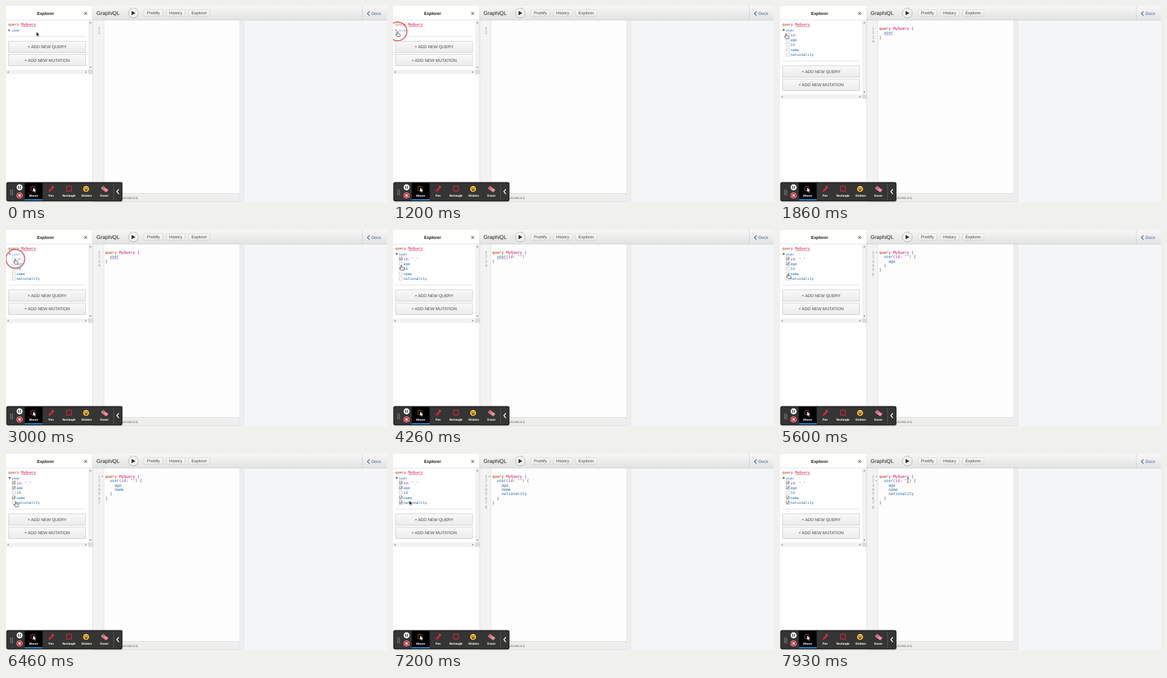
These frames come from a looping animation (640 by 330 pixels, 8 s). An HTML page:

```html
<!DOCTYPE html>
<html lang="en">
<head>
<meta charset="utf-8">
<title>GraphiQL Explorer</title>
<style>
  html, body { margin: 0; width: 100%; height: 100%; overflow: hidden; background: #fff; }
  svg { display: block; }
  text { font: 7px "Liberation Sans", Arial, sans-serif; fill: #444; white-space: pre; text-rendering: geometricPrecision; }
  .mid { text-anchor: middle; }
  .mono text { font: 5.93px "DejaVu Sans Mono", monospace; fill: #555; }
  .mono .code text { font-size: 6.42px; }
  .mono .num { fill: #999; text-anchor: end; }
  .mono .key { fill: #b11a04; }
  .mono .def { fill: #d2054e; }
  .mono .prop { fill: #1f61a0; }
  .mono .attr { fill: #8b2bb9; }
  .mono .str { fill: #b0508c; }
  .tools text { font: bold 4.9px Roboto, sans-serif; fill: #fff; text-anchor: middle; }
  .btn { fill: url(#button); stroke: #c6c6c6; stroke-width: .6; }
</style>
</head>
<body>
<svg width="640" height="330" viewBox="0 0 640 330">
  <defs>
    <linearGradient id="bar" x2="0" y2="1"><stop stop-color="#f7f7f7"/><stop offset="1" stop-color="#e2e2e2"/></linearGradient>
    <linearGradient id="button" x2="0" y2="1"><stop stop-color="#f9f9f9"/><stop offset="1" stop-color="#ebebeb"/></linearGradient>
  </defs>
  <rect width="640" height="330" fill="#fff"/>

  <!-- explorer panel -->
  <g id="lower">
    <rect x="138" y="-18" width="8" height="126" fill="#f1f1f1"/>
    <path d="M4 51.2H133.5" stroke="#d6d6d6" stroke-width=".8"/>
    <g class="mid">
      <rect class="btn" x="4.3" y="59.2" width="129.2" height="19.2" style="stroke:#b9b9b9"/>
      <text x="69" y="71.3">+ ADD NEW QUERY</text>
      <rect class="btn" x="4.3" y="81.5" width="129.2" height="19.2" style="stroke:#b9b9b9"/>
      <text x="69" y="93.5">+ ADD NEW MUTATION</text>
    </g>
    <rect y="107.5" width="138" height="7.3" fill="#f1f1f1"/>
    <rect x="138" y="107.5" width="8" height="7.3" fill="#dcdcdc"/>
    <path d="M140 102.5h3.6l-1.8 2zM4.4 109.4v3.6l-2-1.8zM133.3 109.4v3.6l2-1.8z" fill="#777"/>
  </g>
  <rect width="146" height="24" fill="#fff"/>
  <path d="M0 23.7H146" stroke="#d9d9d9" stroke-width=".7"/>
  <path d="M140 29h3.6l-1.8-2z" fill="#777"/>
  <text class="mid" x="66.5" y="14.9" style="font-weight:bold;fill:#111">Explorer</text>
  <path d="M131.6 10.4l4.2 4.2m0-4.2l-4.2 4.2" stroke="#111"/>
  <g class="mono">
    <text x="4" y="33"><tspan class="key">query</tspan> <tspan class="def">MyQuery</tspan></text>
    <path d="M25.4 34.7H50.3" stroke="#c33b55" stroke-width=".6"/>
    <path id="twisty" fill="#444"/>
    <text class="prop" x="9.8" y="43">user</text>
    <g id="fields"></g>
  </g>

  <!-- editor and result -->
  <rect x="146" y="24" width="247" height="292" fill="#fdfdfd"/>
  <rect x="146" y="24" width="18.5" height="292" fill="#f3f3f3"/>
  <path d="M164.6 24V316" stroke="#d4d4d4" stroke-width=".6"/>
  <path d="M145.7 0V330" stroke="#cfcfcf" stroke-width=".7"/>
  <g class="mono"><g class="code" id="code"></g></g>
  <rect x="399" y="24" width="241" height="306" fill="#f4f5f7"/>
  <rect x="392.5" y="24" width="7" height="306" fill="#eee"/>
  <path d="M392.6 24V330M399.4 24V330" stroke="#dcdcdc" stroke-width=".6"/>
  <rect x="146" y="315.5" width="246.5" height="14" fill="#eee"/>
  <path d="M146 315.6H392.5M146 329.5H392.5" stroke="#d3d3d3" stroke-width=".7"/>
  <text x="221.8" y="324.7" text-anchor="end" style="font-size:5px;letter-spacing:.5px;fill:#555">QUERY VARIABLES</text>

  <!-- top bar -->
  <rect x="146" width="494" height="23.7" fill="url(#bar)"/>
  <path d="M146 23.7H640M598.5 0V23.7" stroke="#cbcbcb" stroke-width=".7"/>
  <text x="152" y="15.3" style="font-size:9px;fill:#222">Graph<tspan font-style="italic">i</tspan>QL</text>
  <circle cx="213.8" cy="11.8" r="8.3" fill="url(#button)" stroke="#999" stroke-width=".7"/>
  <path d="M211 8.2v7.4l6.4-3.7z" fill="#333"/>
  <g class="mid">
    <rect class="btn" x="231.7" y="6.4" width="31.6" height="10.8" rx="1.4"/><text x="247.6" y="14.1">Prettify</text>
    <rect class="btn" x="269.3" y="6.4" width="31.6" height="10.8" rx="1.4"/><text x="285" y="14.1">History</text>
    <rect class="btn" x="306.7" y="6.4" width="35.6" height="10.8" rx="1.4"/><text x="324.5" y="14.1">Explorer</text>
  </g>
  <path d="M610.6 9l-3.6 3.7 3.6 3.7" fill="none" stroke="#3b5998" stroke-width="1.1"/>
  <text x="614" y="15" style="fill:#3b5998">Docs</text>

  <!-- recorder toolbar -->
  <g class="tools">
    <rect x=".6" y="296.6" width="195" height="32.4" rx="3" fill="#1d1d1d" stroke="#888" stroke-opacity=".5" stroke-width=".8"/>
    <rect x="2" y="298" width="192" height="29.6" rx="2" fill="#353535"/>
    <path d="M8 309.5v9M11 309.5v9" stroke="#ccc" stroke-width="1.2" stroke-dasharray="1.2 1.3"/>
    <circle cx="22.8" cy="305.4" r="5.1" fill="#f4f4f4"/>
    <path d="M21.3 303v4.8M24.3 303v4.8" stroke="#333" stroke-width="1.2"/>
    <circle cx="22.8" cy="319" r="5.1" fill="#f4dede"/>
    <circle cx="22.8" cy="319" r="4.4" fill="#d8273c"/>
    <rect x="21" y="317.2" width="3.6" height="3.6" fill="#fff"/>
    <rect x="31.5" y="298" width="30" height="29.6" fill="#000"/>
    <rect x="31.5" y="325.4" width="30" height="1.8" fill="#2f9fe8"/>
    <circle cx="45.3" cy="307.4" r="4" fill="none" stroke="#d9535c" stroke-width=".9"/>
    <path d="M45.6 305.8v7.2l1.7-1.5 1.2 2.5 1.2-.6-1.2-2.4h2.2z" fill="#fff"/>
    <path d="M71.6 313l.8-3 5.6-6 2.3 2.2-5.8 5.8z" fill="#d8273c"/>
    <path d="M77.2 303.6l1-1 2.4 2.3-1 1z" fill="#ef5a66"/>
    <rect x="101.7" y="303.4" width="8" height="8.3" fill="none" stroke="#d8273c" stroke-width="1.2"/>
    <circle cx="134.5" cy="308" r="5" fill="#f8c83a"/>
    <path d="M131.4 308.6q3.1 6 6.2 0z" fill="#70401c"/>
    <path d="M131.6 306.5h2.2m1.4 0h2.2" stroke="#70401c" stroke-width="1.3"/>
    <path d="M160 306l3-3 9 6.5-2.6 3.6q-1 .8-2 0l-6.8-4.8q-1.4-1.2-.6-2.3z" fill="#e98a9c"/>
    <path d="M160 306l3-3 3.5 2.5-3 4z" fill="#c9687f"/>
    <text x="46.5" y="320.8">Mouse</text><text x="75.8" y="320.8">Pen</text><text x="105.7" y="320.8">Rectangle</text>
    <text x="135.5" y="320.8">Stickers</text><text x="165.2" y="320.8">Eraser</text>
    <path d="M180.7 298V327.6" stroke="#666" stroke-width=".7"/>
    <path d="M189.6 308.6l-3.4 3.9 3.4 3.9" fill="none" stroke="#fff" stroke-width="1.5"/>
  </g>

  <circle id="ring" fill="#fff" fill-opacity=".35" stroke="#d8555f" stroke-opacity=".85" stroke-width="2"/>
  <g id="pointer" stroke-linejoin="round">
    <path id="arrow" d="M0 0v7.4l1.8-1.5 1.2 2.6 1.3-.6-1.2-2.5h2.4z" fill="#111" stroke="#fff" stroke-width=".6"/>
    <path id="hand" d="M-.9 .6q.8-1.2 1.5 0v3l3.3.8q.9.4.8 1.4l-.8 3H-.6l-2.5-3.5q.2-1.2 1.2-.6l1 .9z" fill="#fff" stroke="#222" stroke-width=".7"/>
    <path id="beam" d="M-1.5-4q1.5 0 1.5 1v6q0 1-1.5 1M1.5-4Q0-4 0-3M0 3q0 1 1.5 1" fill="none" stroke="#333" stroke-width=".7"/>
  </g>
</svg>
<script>
const LOOP = 8000, LINE = 7.41;
const $ = id => document.getElementById(id);

// Moments at which the query changes: expand, then id, age, name, nationality.
const EDITS = [1400, 3200, 5000, 6060, 7000];
// Press and release times of each click.
const CLICKS = [[1200, 1400], [3000, 3200], [4800, 5000], [5860, 6060], [6800, 7000]];
// Pointer stops: time, x, y.
const PATH = [
  [60, 51, 43.5], [860, 7.5, 42.7], [1740, 7.5, 42.7], [2000, 14, 51], [2270, 14, 51], [2400, 15.7, 48.6],
  [3340, 15.7, 48.6], [3660, 15, 53], [3740, 15, 53], [3930, 14, 56], [4070, 14, 56], [4260, 14, 59],
  [4600, 14, 57], [5060, 14, 57], [5600, 14, 73], [6100, 14, 73], [6460, 16.5, 80.3],
  [7130, 16.5, 80.3], [7600, 192, 51], [7930, 215, 44.5]
];

const span = (kind, text) => `<tspan class="${kind}">${text}</tspan>`;

function fieldRows(stage) {
  if (!stage) return '';
  const rows = [['id:', 2], ['age', 3], ['id', 9], ['name', 4], ['nationality', 5]];
  return rows.map(([name, at], i) => {
    const y = 48.4 + i * 8.35, checked = stage >= at;
    const label = i ? span('prop', name) : span('attr', name) + (checked ? span('str', ' "_"') : '');
    return `<rect x="10.5" y="${y - 2.7}" width="5.2" height="5.2" fill="#fff" stroke="${checked ? '#777' : '#bbb'}" stroke-width=".7"/>` +
      (checked ? `<path d="M11.6 ${y}l1.3 1.4 2-3" fill="none" stroke="#333" stroke-width=".9"/>` : '') +
      `<text x="17.6" y="${y + 2.1}">${label}</text>`;
  }).join('');
}

function codeLines(stage) {
  if (!stage) return ['', ''];
  const args = stage > 1 ? `(${span('attr', 'id')}: ${span('str', '""')})` : '';
  const fields = ['age', 'name', 'nationality'].slice(0, Math.max(0, stage - 2));
  return [
    `${span('key', 'query')} ${span('def', 'MyQuery')} {`,
    `  ${span('prop', 'user')}${args}${fields.length ? ' {' : ''}`,
    ...fields.map(name => '    ' + span('prop', name)),
    ...(fields.length ? ['  }'] : []),
    '}', ''
  ];
}

function editor(stage, folds) {
  let out = codeLines(stage).map((line, i) => {
    const y = 39.8 + i * LINE;
    return `<text class="num" x="158.3" y="${y}">${i + 1}</text><text x="166.8" y="${y}">${line}</text>` +
      (i < folds ? `<path d="M160.2 ${y - 2.8}h3l-1.5 1.9z" fill="#999"/>` : '');
  }).join('');
  if (stage === 1 || stage === 2)
    out += `<path d="M174.6 48.5h${stage === 1 ? 15.4 : 18}" stroke="#b5506a" stroke-width=".6"/>`;
  return out;
}

function position(t) {
  const next = PATH.findIndex(p => p[0] > t);
  if (next < 1) return (next ? PATH[PATH.length - 1] : PATH[0]).slice(1);
  const [t0, x0, y0] = PATH[next - 1], [t1, x1, y1] = PATH[next];
  const u = (t - t0) / (t1 - t0), e = u * u * (3 - 2 * u);
  return [x0 + (x1 - x0) * e, y0 + (y1 - y0) * e];
}

let shown;
function draw(t) {
  const stage = EDITS.filter(at => t >= at).length;
  const folds = (t >= 5600) + (t >= 7600);
  if (shown !== stage + '/' + folds) {
    shown = stage + '/' + folds;
    $('fields').innerHTML = fieldRows(stage);
    $('code').innerHTML = editor(stage, folds);
    $('lower').setAttribute('transform', `translate(0 ${stage ? 41.6 : 0})`);
    $('twisty').setAttribute('d', stage ? 'M4 39.3h4.4l-2.2 3z' : 'M4.4 38.8v4.2l2.4-2.1z');
  }

  const [x, y] = position(t);
  $('pointer').setAttribute('transform', `translate(${x} ${y})`);
  const kind = x > 165 ? 'beam' : x > 25 ? 'arrow' : 'hand';
  for (const id of ['arrow', 'hand', 'beam']) $(id).style.display = id === kind ? '' : 'none';

  const click = CLICKS.find(([down, up]) => t >= down && t < up + 60);
  const ring = $('ring');
  ring.style.display = click ? '' : 'none';
  if (click) {
    ring.setAttribute('cx', x);
    ring.setAttribute('cy', y);
    ring.setAttribute('r', t < click[1] ? 15.8 : 13.2);
  }
}

function tick() {
  draw(performance.now() % LOOP);
  requestAnimationFrame(tick);
}
tick();
</script>
</body>
</html>
```
